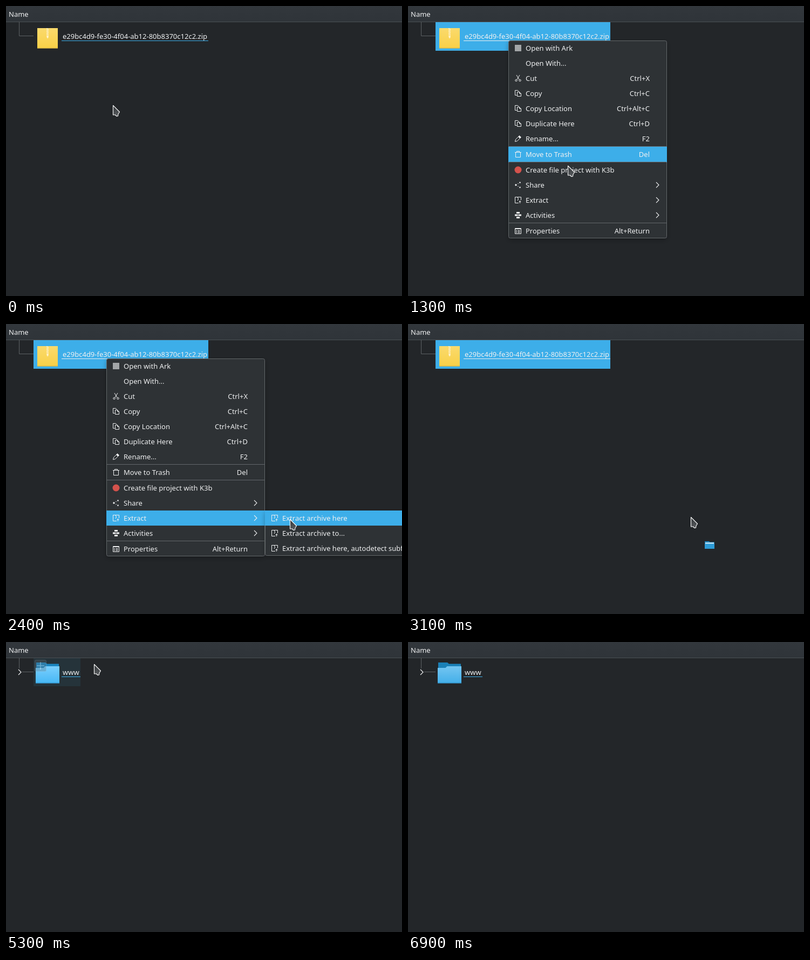
Recreate the animation shown at these times as an HTML page. Size 734x538 px, loop 7 s.

```html
<!DOCTYPE html>
<html lang="en">
<head>
<meta charset="utf-8">
<title>Extract archive</title>
<style>
  html, body { margin: 0; width: 100%; height: 100%; overflow: hidden; background: #232629; }
  svg { display: block; width: 100%; height: 100%; }
  text { font: 13px "Noto Sans", sans-serif; fill: #eff0f1; white-space: pre; }
  .line { fill: none; stroke: #eff0f1; }
  .tree { fill: none; stroke: #5d6164; }
</style>
</head>
<body>
<svg id="stage" viewBox="0 0 734 538">
  <defs>
    <linearGradient id="zipFill" x2="0" y2="1">
      <stop stop-color="#fbda6c"/><stop offset="1" stop-color="#f8d047"/>
    </linearGradient>
    <linearGradient id="dirFill" x2="0" y2="1">
      <stop stop-color="#74c5f1"/><stop offset="1" stop-color="#43afe9"/>
    </linearGradient>
    <linearGradient id="headFill" x2="0" y2="1">
      <stop stop-color="#32373c"/><stop offset="1" stop-color="#2f3439"/>
    </linearGradient>
    <linearGradient id="arrowFill" x2="0" y2="1">
      <stop stop-color="#34383b"/><stop offset="1" stop-color="#5a5d60"/>
    </linearGradient>
    <filter id="shadow" x="-10%" y="-10%" width="120%" height="120%">
      <feDropShadow dx="0" dy="3" stdDeviation="5" flood-color="#000" flood-opacity=".28"/>
    </filter>
    <g id="zip">
      <path fill="url(#zipFill)" d="M58 11h38v37.5H58z"/>
      <path fill="#d9b544" d="M58 47.5h38v1H58z"/>
      <path stroke="#fff6d8" stroke-width="2" stroke-dasharray="1.5 1.5" d="M76 11v17M78 12.500v16"/>
      <path fill="#fff6d8" d="M75.500 26h3l-1.500 5z"/>
    </g>
    <g id="dir">
      <path fill="#1a80b7" d="M56 8h17l3 2.500h22V20H56z"/>
      <path fill="url(#dirFill)" d="M55 18h14.500l3-3H99v31.500H55z"/>
      <path fill="#2f8ec4" d="M55 45.500h44v1H55z"/>
    </g>
  </defs>
  <g id="tree"></g>
  <g id="rows"></g>
  <g id="header">
    <rect width="734" height="29" fill="url(#headFill)"/>
    <rect id="headHover" width="734" height="29" fill="#3daee9" opacity=".2"/>
    <path d="M0 29.500h734" stroke="#4b5054"/>
    <text x="5" y="20">Name</text>
  </g>
  <g id="menus"></g>
  <g id="launch">
    <path fill="#1a80b7" d="M0 0h8l1.500 1.500H18V6H0z"/>
    <path fill="#dff1fb" d="M1 2.500h16V5H1z"/>
    <path fill="#2d9bd6" d="M0 4.500h18V14H0z"/>
  </g>
  <path id="arrow" fill="url(#arrowFill)" stroke="#fff" stroke-width="1.100" stroke-linejoin="round"
    d="M.5.5V18H4.500L7 20.500 9.500 20 10 16.500 12.500 12.500Z"/>
</svg>
<script>
const LOOP = 7000, STEP = 100;
const $ = id => document.getElementById(id);
const show = (el, on) => el.setAttribute('display', on ? 'inline' : 'none');
const move = (el, x, y) => el.setAttribute('transform', `translate(${x} ${y})`);

function add(parent, markup) {
  const g = document.createElementNS('http://www.w3.org/2000/svg', 'g');
  g.innerHTML = markup;
  return parent.appendChild(g);
}

// File rows
const UUID = 'e29bc4d9-fe30-4f04-ab12-80b8370c12c2';

function makeRow(icon, label, right) {
  const w = right - 51;
  const el = add($('rows'), `
    <rect class="sel" x="51" width="${w}" height="53" fill="#3daee9"/>
    <rect class="glow" x="51" width="${w}" height="52" fill="#3daee9"/>
    <use class="icon" href="#${icon}"/>
    <g class="mark">
      <rect x="53.500" y="3.500" width="21" height="21" rx="2" fill="#5b6a74" fill-opacity=".7" stroke="#a9b4bb" stroke-opacity=".5"/>
      <path d="M64 7v14M57 14h14" stroke="#fff" stroke-opacity=".8" stroke-width="1.500"/>
    </g>
    <text x="105" y="31">${label}</text>
    <path class="under" d="M103 34.500H${right}"/>`);
  const part = name => el.querySelector('.' + name);
  return { el, right, sel: part('sel'), glow: part('glow'), icon: part('icon'), mark: part('mark'), under: part('under') };
}

const stripe = add($('tree'), '<rect y="82" width="734" height="52" fill="#31363b"/>');
const leafLines = add($('tree'), '<path class="tree" d="M24.500 30v25.500H51"/>');
const dirLines = add($('tree'), `<path class="tree" d="M24.500 30v19M30 55.500h21"/>
  <path class="line" stroke-width="1.200" d="M23 51l5 5-5 5"/>`);
const nextLines = add($('tree'), '<path class="tree" d="M24.500 63v44.500H51"/>');
const zipRow = makeRow('zip', UUID + '.zip', 375);
const dirRow = makeRow('dir', UUID, 354);
const wwwRow = makeRow('dir', 'www', 138);

// Menus
const line = d => `<path class="line" d="${d}"/>`;
const copyIcon = line('M5.500 11.500h-3v-9h5l2 2M6.500 5.500h4l3 3v5h-7zM10.500 5.500v3h3');
const extractIcon = line('M9 13.500H2.500v-11h11V8M7.500 3v2M8.500 5v2M7.500 7v2M11.500 14V9.500M9.500 11.500l2-2 2 2');
const icons = {
  ark: '<rect x="2" y="2" width="12" height="12" fill="#a3a6a8"/>',
  cut: line('M5 2l5 8.500M11 2L6 10.500') + '<g class="line"><circle cx="4.500" cy="12" r="1.700"/><circle cx="11.500" cy="12" r="1.700"/></g>',
  copy: copyIcon,
  rename: line('M2.500 13.500l1-4 7-7 3 3-7 7zM8.500 4.500l3 3') + '<path fill="#eff0f1" d="M8.500 4.500l2-2 3 3-2 2z"/>',
  trash: line('M2 4.500h12M5.500 4V2.500h5V4M3.500 5v8.500h9V5'),
  burn: '<circle cx="8" cy="8" r="6.500" fill="#d4524c"/>',
  share: '<g fill="#eff0f1"><circle cx="4" cy="8" r="1.700"/><circle cx="11.500" cy="3.500" r="1.300"/><circle cx="11.500" cy="12.500" r="1.300"/><circle cx="8" cy="5.500" r=".7"/><circle cx="8" cy="10.500" r=".7"/></g>',
  extract: extractIcon,
  acts: '<path fill="#eff0f1" d="M5 2h6v3H5zM2 6.500h12v3H2zM5 11h6v3H5z"/><path stroke="#2d3136" d="M8 6.500v3"/>',
  props: line('M2.500 3.500h11v10h-11zM2 4.500h12M4 7.500h2M4 9.500h2M4 11.500h2M7.500 7.500h4M7.500 9.500h4M7.500 11.500h4')
};

// centre, icon, label, shortcut ('>' opens a submenu)
const items = [
  [78, 'ark', 'Open with Ark'],
  [106, '', 'Open With...'],
  [134, 'cut', 'Cut', 'Ctrl+X'],
  [162, 'copy', 'Copy', 'Ctrl+C'],
  [190, 'copy', 'Copy Location', 'Ctrl+Alt+C'],
  [218, 'copy', 'Duplicate Here', 'Ctrl+D'],
  [246, 'rename', 'Rename...', 'F2'],
  [275, 'trash', 'Move to Trash', 'Del'],
  [304, 'burn', 'Create file project with K3b'],
  [332, 'share', 'Share', '>'],
  [360, 'extract', 'Extract', '>'],
  [388, 'acts', 'Activities', '>'],
  [417, 'props', 'Properties', 'Alt+Return']
];
const subItems = ['Extract archive here', 'Extract archive to...', 'Extract archive here, autodetect subfolder']
  .map((label, i) => [360 + 28 * i, 'extract', label]);

function itemMarkup(x, [cy, icon, label, key]) {
  let out = `<g transform="translate(${x + 10} ${cy - 8})">${icons[icon] || ''}</g>
    <text x="${x + 32}" y="${cy + 5}">${label}</text>`;
  if (key === '>') out += `<path class="line" stroke-width="1.100" d="M460 ${cy - 5}l5 5-5 5"/>`;
  else if (key) out += `<text x="448" y="${cy + 5}" text-anchor="end">${key}</text>`;
  return out;
}

function makeMenu(x, y, w, h, list, seps) {
  const el = add($('menus'), `
    <rect x="${x + .5}" y="${y + .5}" width="${w - 1}" height="${h - 1}" rx="3" fill="#2d3136" stroke="#63676b" filter="url(#shadow)"/>
    <rect class="hot" x="${x}" width="${w}" height="28" fill="#3daee9"/>
    ${seps.map(s => `<path stroke="#63676b" d="M${x + 1} ${s}.5h${w - 2}"/>`).join('')}
    ${list.map(it => itemMarkup(x, it)).join('')}`);
  return { el, hot: el.querySelector('.hot') };
}

const menu = makeMenu(186, 64, 294, 367, items, [260, 289, 402]);
const sub = makeMenu(480, 346, 320, 84, subItems, []);

// Pointer path: time in steps, x, y
const path = [
  [0, 198, 184], [1, 200, 165], [2, 196, 120], [3, 190, 75], [4, 186, 63], [7, 186, 63],
  [8, 192, 80], [10, 225, 160], [12, 280, 262], [13, 296, 296], [14, 304, 320], [16, 325, 357],
  [18, 400, 362], [20, 505, 352], [22, 600, 330], [24, 526, 362], [29, 526, 362],
  [31, 524, 358], [33, 516, 343], [39, 516, 343], [40, 505, 335], [41, 440, 300], [42, 300, 210],
  [43, 150, 115], [44, 91, 54], [46, 82, 50], [48, 82, 50], [49, 95, 80], [50, 115, 152],
  [51, 135, 120], [52, 125, 60], [53, 163, 41], [54, 190, 70], [55, 179, 104], [56, 179, 104],
  [64, 48, 74], [66, 55, 42], [67, 56, 20], [68, 56, 4], [69, 56, -30]
];

function pointer(t) {
  if (t > 5600 && t < 6400) {
    const a = .7 - (t - 5600) / 800 * (Math.PI + .7);
    return [122 + 74 * Math.cos(a), 74 + 46 * Math.sin(a)];
  }
  const s = Math.max(0, t / STEP);
  const i = path.findIndex(p => p[0] > s);
  if (i < 0) return path[path.length - 1].slice(1);
  const [t0, x0, y0] = path[i - 1], [t1, x1, y1] = path[i];
  const k = (s - t0) / (t1 - t0);
  return [x0 + (x1 - x0) * k, y0 + (y1 - y0) * k];
}

function drawRow(row, on, y, t, selected, current) {
  show(row.el, on);
  if (!on) return;
  move(row.el, 0, y);
  const inside = time => {
    const [px, py] = pointer(time);
    return px >= 51 && px < row.right && py >= y && py < y + 52 ? 1 : 0;
  };
  const menuOpen = t >= 700 && t < 2900;
  const h = menuOpen ? 0 : (inside(t) + inside(t - STEP)) / 2;
  show(row.sel, selected);
  row.glow.setAttribute('opacity', selected ? 0 : h * .18);
  row.mark.setAttribute('opacity', h * .85);
  row.icon.style.filter = h ? `brightness(${1 + .1 * h})` : 'none';
  show(row.under, current);
  row.under.setAttribute('stroke', selected ? '#eff0f1' : '#3daee9');
}

function draw(t) {
  const [x, y] = pointer(t), [lagX, lagY] = pointer(t - STEP);
  const unpacked = t >= 3500, opened = t >= 4800, both = unpacked && !opened;

  show(stripe, both);
  show(leafLines, !unpacked);
  show(dirLines, unpacked);
  show(nextLines, both);
  drawRow(zipRow, !opened, unpacked ? 82 : 30, t, t >= 400 && t < 3300, true);
  drawRow(dirRow, both, 30, t, false, false);
  drawRow(wwwRow, opened, 30, t, false, true);
  show($('headHover'), t >= 6700 && t < 6900);

  const fade = t < 2800 ? 1 : .4;
  show(menu.el, t >= 700 && t < 2900);
  show(sub.el, t >= 1800 && t < 2900);
  $('menus').setAttribute('opacity', fade);
  const hot = t >= 1700 ? items[10] : lagX >= 186 && items.find(it => Math.abs(lagY - it[0]) <= 14);
  show(menu.hot, !!hot);
  if (hot) {
    menu.hot.setAttribute('y', hot[0] - 14);
    menu.hot.setAttribute('height', hot[1] === 'trash' ? 29 : 28);
  }
  show(sub.hot, t >= 2100);
  sub.hot.setAttribute('y', 346);

  show($('launch'), t >= 2900 && t < 3300);
  move($('launch'), x + 26, y + 45 - 10 * Math.abs(Math.sin((t - 3100) / 400 * Math.PI)));
  show($('arrow'), t < 6900);
  move($('arrow'), Math.round(x), Math.round(y));
}

function tick() {
  const t = performance.now() % LOOP;
  draw(Math.floor(t / STEP) * STEP);
  requestAnimationFrame(tick);
}
tick();
</script>
</body>
</html>
```
